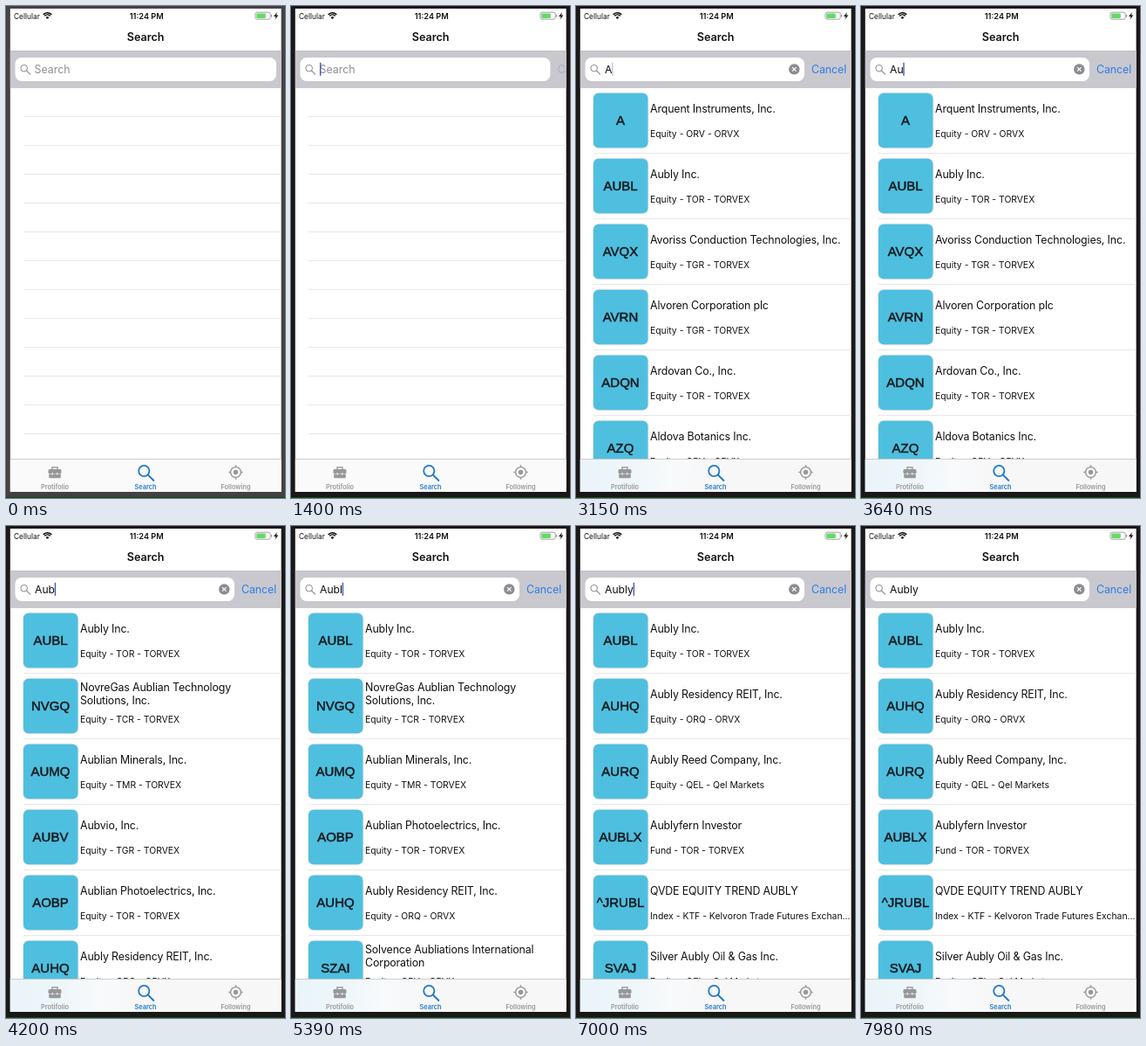
These frames come from a looping animation (320 by 563 pixels, 8000 ms). An HTML page with a canvas:

```html
<!DOCTYPE html>
<html lang="en">
<head>
<meta charset="utf-8">
<title>Search</title>
<style>
html, body { margin: 0; width: 100%; height: 100%; overflow: hidden; background: #1a1718; }
canvas { display: block; width: 320px; height: 563px; }
</style>
</head>
<body>
<canvas id="stage"></canvas>
<script>
const W = 320, H = 563, LOOP = 8000;
const SCREEN = { x: 4.6, y: 3, w: 311.2, h: 553 };
const GRAY = '#98989b', BLUE = '#2179c8', LINK = '#2a7eea';
const canvas = document.getElementById('stage');
const ctx = canvas.getContext('2d');
const dpr = window.devicePixelRatio || 1;
canvas.width = W * dpr;
canvas.height = H * dpr;

const FOCUS = 1260;
const KEYS = [[2240, 'A'], [3500, 'Au'], [3710, 'Aub'], [4340, 'Aubl'], [5530, 'Aubly']];

const market = {
  orv: 'Equity - ORV - ORVX',
  orq: 'Equity - ORQ - ORVX',
  tor: 'Equity - TOR - TORVEX',
  tgr: 'Equity - TGR - TORVEX',
  tcr: 'Equity - TCR - TORVEX',
  tmr: 'Equity - TMR - TORVEX',
  qel: 'Equity - QEL - Qel Markets'
};
const aubly = ['AUBL', 'Aubly Inc.', market.tor];
const gas = ['NVGQ', 'NovreGas Aublian Technology\nSolutions, Inc.', market.tcr];
const minerals = ['AUMQ', 'Aublian Minerals, Inc.', market.tmr];
const photo = ['AOBP', 'Aublian Photoelectrics, Inc.', market.tor];
const reit = ['AUHQ', 'Aubly Residency REIT, Inc.', market.orq];
const RESULTS = [
  [2730, [
    ['A', 'Arquent Instruments, Inc.', market.orv],
    aubly,
    ['AVQX', 'Avoriss Conduction Technologies, Inc.', market.tgr],
    ['AVRN', 'Alvoren Corporation plc', market.tgr],
    ['ADQN', 'Ardovan Co., Inc.', market.tor],
    ['AZQ', 'Aldova Botanics Inc.', market.orv]
  ]],
  [4130, [aubly, gas, minerals, ['AUBV', 'Aubvio, Inc.', market.tgr], photo, reit]],
  [4830, [aubly, gas, minerals, photo, reit,
    ['SZAI', 'Solvence Aubliations International\nCorporation', market.orv]]],
  [5950, [
    aubly,
    reit,
    ['AURQ', 'Aubly Reed Company, Inc.', market.qel],
    ['AUBLX', 'Aublyfern Investor', 'Fund - TOR - TORVEX'],
    ['^JRUBL', 'QVDE EQUITY TREND AUBLY', 'Index - KTF - Kelvoron Trade Futures Exchan...'],
    ['SVAJ', 'Silver Aubly Oil & Gas Inc.', market.qel]
  ]]
];

const latest = (events, t) => events.filter(e => e[0] <= t).pop();
const clamp = v => Math.max(0, Math.min(1, v));
const ease = v => v * v * (3 - 2 * v);

function rect(x, y, w, h, color) {
  ctx.fillStyle = color;
  ctx.fillRect(x, y, w, h);
}

function round(x, y, w, h, r, color) {
  ctx.fillStyle = color;
  ctx.beginPath();
  ctx.roundRect(x, y, w, h, r);
  ctx.fill();
}

function line(color, width, ...points) {
  ctx.strokeStyle = color;
  ctx.lineWidth = width;
  ctx.beginPath();
  points.forEach(([x, y], i) => i ? ctx.lineTo(x, y) : ctx.moveTo(x, y));
  ctx.stroke();
}

function circle(x, y, r, color, width) {
  ctx.beginPath();
  ctx.arc(x, y, r, 0, Math.PI * 2);
  if (width) {
    ctx.strokeStyle = color;
    ctx.lineWidth = width;
    ctx.stroke();
  } else {
    ctx.fillStyle = color;
    ctx.fill();
  }
}

function text(str, x, y, size, color = '#111', weight = 400, align = 'left', spacing = 0) {
  ctx.font = `${weight} ${size}px Inter, sans-serif`;
  ctx.letterSpacing = `${spacing}px`;
  ctx.textAlign = align;
  ctx.fillStyle = color;
  ctx.fillText(str, x, y);
  const width = ctx.measureText(str).width;
  ctx.letterSpacing = '0px';
  return width;
}

function magnifier(x, y, r, color, width) {
  circle(x, y, r, color, width);
  const d = r * 0.72;
  line(color, width * 1.15, [x + d, y + d], [x + r * 1.9, y + r * 1.9]);
}

function statusBar() {
  text('Cellular', 9, 14.5, 8.4);
  for (const r of [6.6, 4.4]) {
    ctx.beginPath();
    ctx.arc(47.5, 14.4, r, -Math.PI * 0.76, -Math.PI * 0.24);
    ctx.strokeStyle = '#111';
    ctx.lineWidth = 1.5;
    ctx.stroke();
  }
  circle(47.5, 13.3, 1.4, '#111');
  text('11:24 PM', 161.2, 14.6, 9.2, '#111', 600, 'center');
  ctx.strokeStyle = '#8c8c8c';
  ctx.lineWidth = 0.8;
  ctx.beginPath();
  ctx.roundRect(286, 7.2, 17.2, 8, 2);
  ctx.stroke();
  round(287.3, 8.5, 10.5, 5.4, 1, '#66d969');
  rect(304.1, 10, 1, 2.6, '#8c8c8c');
  ctx.fillStyle = '#111';
  ctx.beginPath();
  [[311, 7], [307, 11.9], [309.5, 11.9], [308.5, 15.4], [312.4, 10.4], [310, 10.4]]
    .forEach(([x, y]) => ctx.lineTo(x, y));
  ctx.fill();
}

function caretAlpha(t, since) {
  const period = 890, age = t - since, p = age % period;
  const rise = age < period ? 1 : clamp(p / 60);
  return rise * (1 - clamp((p - 580) / 60));
}

function searchBar(t) {
  const open = ease(clamp((t - FOCUS - 20) / 360));
  const key = latest(KEYS, t);
  rect(SCREEN.x, 51, SCREEN.w, 43, '#c9c8ce');
  rect(SCREEN.x, 51, SCREEN.w, 0.6, '#bcbbc0');
  round(10.5, 59, 299.5 - 48 * open, 27, 7.5, '#fff');
  magnifier(20.7, 71.2, 3.8, '#88888d', 1);

  let caretX = 33;
  if (key) {
    caretX += text(key[1], 33, 76.6, 12.2, '#111') - 0.3;
    circle(250.3, 72.4, 6.2, '#8b8b90');
    line('#fff', 1.2, [248, 70.1], [252.6, 74.7]);
    line('#fff', 1.2, [252.6, 70.1], [248, 74.7]);
  } else {
    text('Search', 32.5, 76.6, 12.4, '#8e8e93');
  }
  if (t >= FOCUS) {
    ctx.globalAlpha = caretAlpha(t, key ? key[0] : FOCUS);
    rect(caretX, 64.8, 1.4, 15, '#4059b4');
    ctx.globalAlpha = open;
    text('Cancel', 270 + 48 * (1 - open), 76.6, 12.4, LINK, 400, 'left', -0.1);
    ctx.globalAlpha = 1;
  }
}

function resultRow([ticker, name, detail], i) {
  const y = 100 + i * 75;
  ctx.shadowColor = 'rgba(0, 40, 60, 0.3)';
  ctx.shadowBlur = 2 * dpr;
  round(20, y - 0.2, 62.4, 62.4, 6, '#4fbfdf');
  ctx.shadowColor = 'transparent';
  ctx.font = '15px "Liberation Sans", Arial, sans-serif';
  ctx.textAlign = 'center';
  ctx.fillStyle = ctx.strokeStyle = '#12191c';
  ctx.lineWidth = 0.5;
  ctx.fillText(ticker, 51, y + 36.4);
  ctx.strokeText(ticker, 51, y + 36.4);

  const lines = name.split('\n');
  const top = y + (lines.length > 1 ? 14 : 21.6);
  lines.forEach((s, n) => text(s, 85, top + n * 14.6, 12.4, '#111', 400, 'left', -0.15));
  text(detail, 85, y + 50.1, 10.4);
  rect(20, y + 68, 296, 0.8, '#e3e3e5');
}

function briefcase(x, y) {
  ctx.strokeStyle = GRAY;
  ctx.lineWidth = 1.4;
  ctx.strokeRect(x - 3, y - 5.6, 6, 3.5);
  round(x - 7.5, y - 3.5, 15, 5.2, 1.5, GRAY);
  round(x - 6.8, y + 2.1, 13.6, 4.6, 1, GRAY);
  rect(x - 3.4, y + 0.6, 1.2, 2.4, '#fafafa');
  rect(x + 2.2, y + 0.6, 1.2, 2.4, '#fafafa');
}

function target(x, y) {
  circle(x, y, 5.9, GRAY, 1.4);
  circle(x, y, 2.7, GRAY);
  for (const [dx, dy] of [[1, 0], [-1, 0], [0, 1], [0, -1]]) {
    line(GRAY, 1.5, [x + dx * 5.5, y + dy * 5.5], [x + dx * 8.2, y + dy * 8.2]);
  }
}

function tabBar(tinted) {
  rect(SCREEN.x, 518.5, SCREEN.w, 37.5, tinted ? '#f7f7f8' : '#fafafa');
  if (tinted) {
    const tint = ctx.createLinearGradient(5, 0, 150, 0);
    tint.addColorStop(0, '#eaf4f9');
    tint.addColorStop(0.4, '#eef6fa');
    tint.addColorStop(0.7, '#f8fafb');
    tint.addColorStop(1, '#f7f7f8');
    rect(SCREEN.x, 518.5, 146, 37.5, tint);
  }
  rect(SCREEN.x, 518, SCREEN.w, 0.8, '#c4c4c6');
  briefcase(56, 533.5);
  magnifier(158.3, 532, 6.1, BLUE, 1.8);
  target(263.5, 533.5);
  text('Protifolio', 56, 552.9, 7.4, GRAY, 600, 'center');
  text('Search', 160, 552.9, 7.4, BLUE, 600, 'center');
  text('Following', 263.5, 552.9, 7.4, GRAY, 600, 'center');
}

function draw(t) {
  ctx.setTransform(dpr, 0, 0, dpr, 0, 0);
  rect(0, 0, W, H, t < FOCUS ? '#434142' : '#1a1718');
  rect(0, 562, W, 1, '#0b4a10');
  ctx.save();
  ctx.beginPath();
  ctx.rect(SCREEN.x, SCREEN.y, SCREEN.w, SCREEN.h);
  ctx.clip();
  rect(SCREEN.x, SCREEN.y, SCREEN.w, SCREEN.h, '#fff');
  statusBar();
  text('Search', 160.2, 39.8, 12.6, '#111', 600, 'center');

  const found = latest(RESULTS, t);
  if (found) {
    found[1].forEach(resultRow);
  } else {
    for (let y = 126; y < 500; y += 33) rect(20, y, 296, 0.9, '#e6e6e8');
  }
  searchBar(t);
  tabBar(Boolean(found));
  ctx.restore();
}

const start = performance.now();
function tick() {
  draw((performance.now() - start) % LOOP);
  requestAnimationFrame(tick);
}
tick();
</script>
</body>
</html>
```
